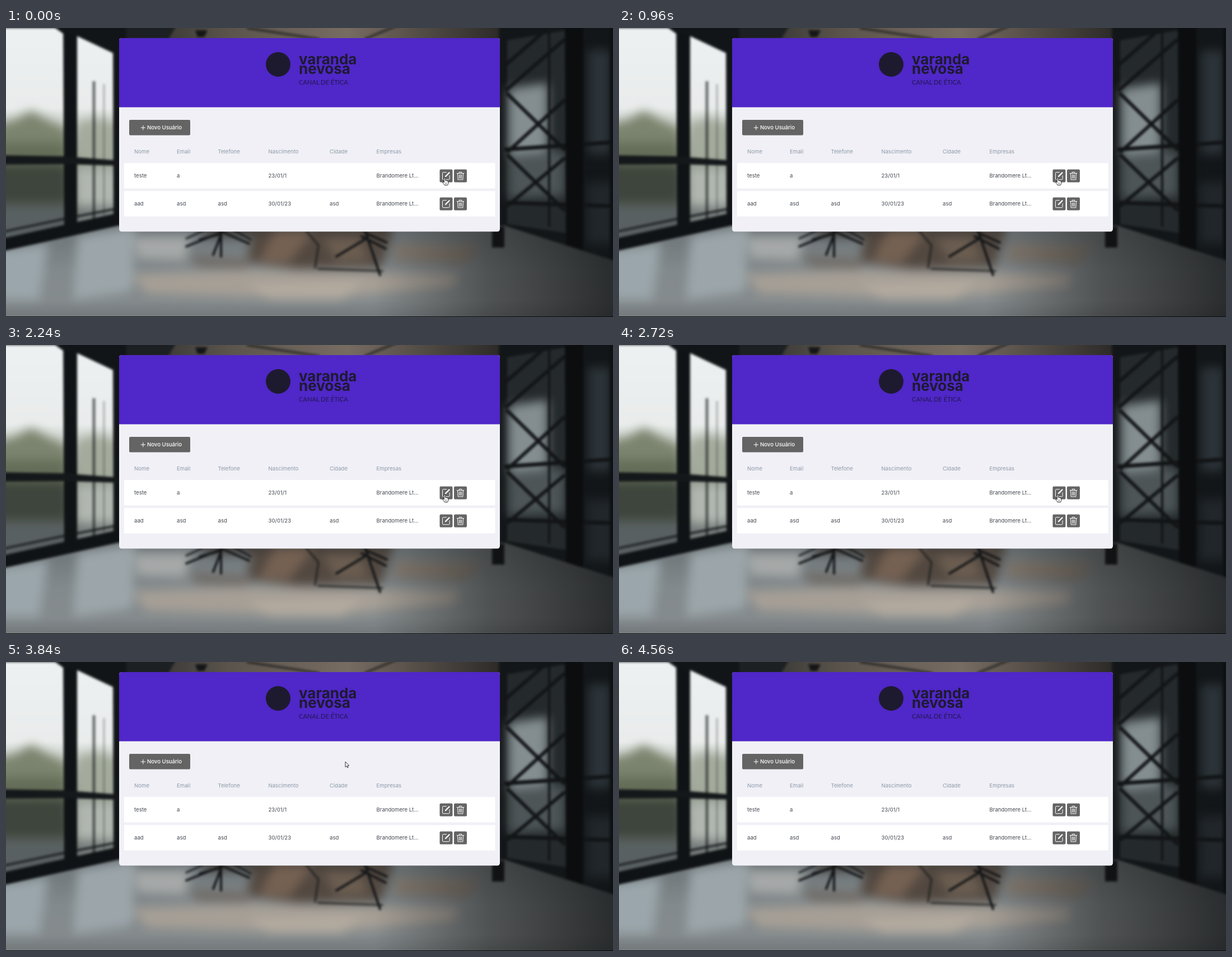
An HTML page for the animation above (4640 ms loop, 1084 by 516 pixels).

```html
<!DOCTYPE html>
<html lang="pt-BR">
<head>
<meta charset="utf-8">
<title>Usuários</title>
<style>
  html, body { margin: 0; width: 100%; height: 100%; overflow: hidden; background: #26292b; }
  svg { display: block; width: 100%; height: 100%; }
  filter { color-interpolation-filters: sRGB; }
  text { font-family: Inter, sans-serif; font-size: 9.6px; }
  .head { fill: #8e9aa8; }
  .cell { fill: #454a52; }
  .btn { fill: #646464; }
  .icon { fill: none; stroke: #fff; stroke-width: 1; stroke-linecap: round; stroke-linejoin: round; }
  .solid { fill: #fff; stroke: none; }
  .logo { fill: #1d1a30; font-size: 26px; font-weight: 700; }
  .tag { fill: #21184f; font: 11.1px Lato, sans-serif; }
  .line { fill: none; stroke: #121416; }
</style>
</head>
<body>
<svg viewBox="0 0 1084 516" preserveAspectRatio="none">
  <defs>
    <linearGradient id="sky" x2="0" y2="1">
      <stop offset="0" stop-color="#eef1f2"/>
      <stop offset=".36" stop-color="#e9eceb"/>
      <stop offset=".5" stop-color="#a9b1a3"/>
      <stop offset=".72" stop-color="#6a7266"/>
      <stop offset="1" stop-color="#454b4b"/>
    </linearGradient>
    <linearGradient id="floor" x2="0" y2="1">
      <stop offset="0" stop-color="#6a7174"/>
      <stop offset=".4" stop-color="#838a8d"/>
      <stop offset=".65" stop-color="#858b8d"/>
      <stop offset="1" stop-color="#585f62"/>
    </linearGradient>
    <linearGradient id="shade">
      <stop offset=".6" stop-color="#1b1a19" stop-opacity="0"/>
      <stop offset=".78" stop-color="#1b1a19" stop-opacity=".5"/>
      <stop offset="1" stop-color="#141618" stop-opacity=".85"/>
    </linearGradient>
    <linearGradient id="ceiling">
      <stop offset="0" stop-color="#25282a"/>
      <stop offset=".3" stop-color="#5b544c"/>
      <stop offset=".6" stop-color="#776c62"/>
      <stop offset="1" stop-color="#2a2826"/>
    </linearGradient>
    <filter id="soft" filterUnits="userSpaceOnUse" x="-40" y="-40" width="1164" height="600"><feGaussianBlur stdDeviation="2"/></filter>
    <filter id="haze" filterUnits="userSpaceOnUse" x="-80" y="-80" width="1244" height="700"><feGaussianBlur stdDeviation="9"/></filter>
    <clipPath id="panes"><path d="M-30-30H206V338L-30 390Z"/></clipPath>
    <clipPath id="ground"><path d="M-30 404 200 353H890L1114 425V560H-30Z"/></clipPath>
  </defs>

  <g filter="url(#soft)">
    <path d="M-30-30H1114V546H-30Z" fill="#1d2022"/>
    <path d="M190-30H890V24H190Z" fill="url(#ceiling)"/>
    <path d="M205-30H320L290 20H205Z" fill="#1d2022"/>
    <path d="M338 4H360L354 16H342Z" fill="#141516"/>
    <path d="M430 0 560 20M700-5 640 20" class="line" stroke-width="4" opacity=".7"/>

    <g clip-path="url(#panes)">
      <path d="M-30 0H206V395H-30Z" fill="url(#sky)"/>
      <g filter="url(#haze)">
        <path d="M-30 176 15 165 45 148 75 165 110 182V245H-30Z" fill="#7b846e"/>
        <path d="M-30 205H110V245H-30Z" fill="#646d58"/>
        <path d="M126 172 160 160 210 176V240H126Z" fill="#a3ab9c"/>
        <path d="M-30 244H112V314H-30Z" fill="#3d453c"/>
        <path d="M122 248H205V320H122Z" fill="#b0b7b0"/>
        <path d="M-30 318H110V400H-30Z" fill="#596062"/>
        <path d="M122 318H210V360H122Z" fill="#747b7a"/>
      </g>
      <path d="M157 95V345" class="line" stroke-width="5" opacity=".6"/>
      <path d="M175 100V334" class="line" stroke-width="3" opacity=".3"/>
    </g>
    <path d="M102-20H127V362L104 369Z" fill="#101315"/>
    <path d="M191 20H206V360H192Z" fill="#121517"/>
    <path d="M60-20H215V56L126 14 102 10Z" fill="#121517"/>
    <path d="M-30 227 103 229 206 237V246L103 243-30 244Z" fill="#15181a"/>
    <path d="M-30 381 206 329V357L-30 409Z" fill="#101315"/>
    <path d="M-30 369 103 341 200 322" class="line" stroke-width="4" opacity=".8"/>

    <path d="M880-30H1114V430L882 368Z" fill="#131618"/>
    <path d="M895 22 1000 4V366L895 350Z" fill="#24292b"/>
    <g filter="url(#haze)">
      <path d="M897 108 968 98V225L897 228Z" fill="#848e90"/>
      <path d="M897 228 998 218V300L897 305Z" fill="#4d5557"/>
      <path d="M1040 40H1080V225H1040Z" fill="#2c3439"/>
      <path d="M1036 275H1114V385H1036Z" fill="#20262a"/>
    </g>
    <g class="line" stroke-width="6">
      <path d="M890 68 982-12M892 112 998 20M894 116 998 218M895 222 998 128M895 226 998 326M895 318 998 232"/>
      <path d="M890 217 1084 204M895 312 1084 318" stroke-width="7"/>
      <path d="M970 0V355" stroke-width="4"/>
    </g>
    <path d="M998-30H1031V402L1000 392Z" fill="#0b0d0f"/>
    <path d="M1078-30H1114V420H1078Z" fill="#0e1113"/>

    <g clip-path="url(#ground)">
      <path d="M-30 350H1114V560H-30Z" fill="url(#floor)"/>
      <g filter="url(#haze)">
        <path d="M-30 400 75 385 60 485H-30Z" fill="#9aa6ab"/>
        <path d="M128 372 230 355 225 470 120 485Z" fill="#9ca6aa"/>
        <path d="M230 372 330 372 320 415 235 412Z" fill="#a6a9a8"/>
        <path d="M225 440 430 432 810 440 800 462 560 484 250 474Z" fill="#a69f96"/>
        <path d="M430 458 640 452 600 484 470 484Z" fill="#b4ab9f"/>
        <path d="M700 385 850 390 820 420 690 415Z" fill="#857b70"/>
        <path d="M350 350H690V372H350Z" fill="#3b3734"/>
        <path d="M440 365H690L670 428 520 430 430 418Z" fill="#524840"/>
        <path d="M330 405 440 412 430 430 340 426Z" fill="#706b66"/>
        <path d="M480 362H550L505 420 450 418Z" fill="#756152"/>
        <path d="M565 374 630 374 650 416 590 418Z" fill="#6b5d50"/>
      </g>
      <path d="M-30 350H1114V560H-30Z" fill="url(#shade)"/>
    </g>
    <path d="M868 355H890V392H868Z" fill="#101214"/>
    <g class="line" stroke-width="4" stroke-linecap="round">
      <path d="M384 358V408M384 365 322 390M384 367 346 378M386 364 434 385M384 369 370 405"/>
      <path d="M352 362 322 376M405 360 437 378" stroke-width="3"/>
      <path d="M640 358 668 441M635 372 678 394M642 366 680 383M640 378 590 408"/>
      <path d="M536 362 558 388 552 428M558 430 672 434" opacity=".6"/>
    </g>
  </g>
  <path d="M0 515H1084V516H0Z" fill="#08090a"/>

  <rect x="202" y="18" width="680" height="345.5" rx="4.5" fill="#f0f0f6"/>
  <path d="M202 141.5V22.5a4.5 4.5 0 0 1 4.5-4.5H877.5a4.5 4.5 0 0 1 4.5 4.5V141.5Z" fill="#5027c8"/>
  <circle cx="486" cy="65" r="22" fill="#1d1a30"/>
  <text class="logo" x="523" y="65">varanda</text>
  <text class="logo" x="523" y="82">nevosa</text>
  <text class="tag" x="523" y="101">CANAL DE ÉTICA</text>

  <rect class="btn" x="220" y="164" width="109" height="27.5" rx="2"/>
  <path class="icon" d="M241 178H248.6M244.8 174.2V181.8"/>
  <text x="252" y="181" fill="#fff" font-weight="500">Novo Usuário</text>
  <g id="table"></g>

  <g id="hand" fill="#fff" stroke="#111" stroke-width=".9" stroke-linejoin="round">
    <path d="M-1.2 7V.9Q-1.2-.3 0-.3T1.2.9V4.8Q2.6 4.2 3.1 5.3 4.5 4.8 4.9 5.9 6.3 5.6 6.3 7.3V9.4Q6.3 11 5.1 13H-.2Q-1.4 10.8-3.7 8.6-4.3 7.2-3 7.1-2 7.2-1.2 8.4Z"/>
    <path d="M1.3 8.6V11M3 8.6V11" stroke-width=".6"/>
  </g>
  <path id="arrow" d="M0 0V9.6L2.2 7.6 3.7 10.8 5.2 10.1 3.8 7H6.7Z" fill="#fff" stroke="#222" stroke-width=".9" stroke-linejoin="round"/>
</svg>
<script>
const LOOP = 4640, STEP = 80;
const byId = id => document.getElementById(id);
const hand = byId("hand"), arrow = byId("arrow");

const columns = [229, 305, 378.5, 468.5, 578, 661.5];
const heads = ["Nome", "Email", "Telefone", "Nascimento", "Cidade", "Empresas"];
const users = [
  ["teste", "a", "", "23/01/1", "", "Brandomere Lt..."],
  ["aad", "asd", "asd", "30/01/23", "asd", "Brandomere Lt..."]
];
const pencil = '<path class="icon" d="M12 5.2H6.6Q5 5.2 5 6.8V16.6Q5 18.2 6.6 18.2H16Q17.6 18.2 17.6 16.6V11"/>' +
  '<path class="solid" d="M9.2 13.8 9.8 11.6 16.8 4.4 18.5 6.1 11.4 13.2Z"/>';
const trash = '<path class="icon" d="M5.2 7H17.8M9.2 6.8V4.8H13.8V6.8M6.5 7.2 7.1 18.3H15.9L16.5 7.2' +
  'M9.4 9.5V15.8M11.5 9.5V15.8M13.6 9.5V15.8"/>';

const texts = (items, y, cls) =>
  items.map((s, i) => `<text class="${cls}" x="${columns[i]}" y="${y}">${s}</text>`).join("");
const button = (x, y, icon) =>
  `<g transform="translate(${x} ${y})"><rect class="btn" width="23" height="23" rx="2"/>${icon}</g>`;
const row = (user, i) => {
  const y = 241 + i * 50;
  return `<rect x="211" y="${y}" width="662.5" height="45.5" rx="1" fill="#fff"/>` +
    texts(user, y + 26, "cell") + button(774.5, y + 11.5, pencil) + button(800, y + 11.5, trash);
};
byId("table").innerHTML = texts(heads, 224, "head") + users.map(row).join("");

// Pointer stops: time, x, y
const path = [[3360, 783.5, 267.5], [3840, 606, 178], [4240, 470, -20]];

function pointer(t) {
  if (t <= path[0][0]) return path[0].slice(1);
  const i = path.findIndex(p => t <= p[0]);
  if (i < 0) return path[path.length - 1].slice(1);
  const [t0, x0, y0] = path[i - 1], [t1, x1, y1] = path[i];
  let k = (t - t0) / (t1 - t0);
  if (i === 1) k = k * k * (3 - 2 * k);
  return [x0 + (x1 - x0) * k, y0 + (y1 - y0) * k];
}

function draw(ms) {
  const t = Math.floor((ms % LOOP) / STEP) * STEP;
  const [x, y] = pointer(t);
  const onButton = x > 774 && y > 252;
  hand.style.display = onButton ? "" : "none";
  arrow.style.display = onButton ? "none" : "";
  (onButton ? hand : arrow).setAttribute("transform", `translate(${x} ${y})`);
}

const start = performance.now();
function tick() {
  draw(performance.now() - start);
  requestAnimationFrame(tick);
}
tick();
</script>
</body>
</html>
```
